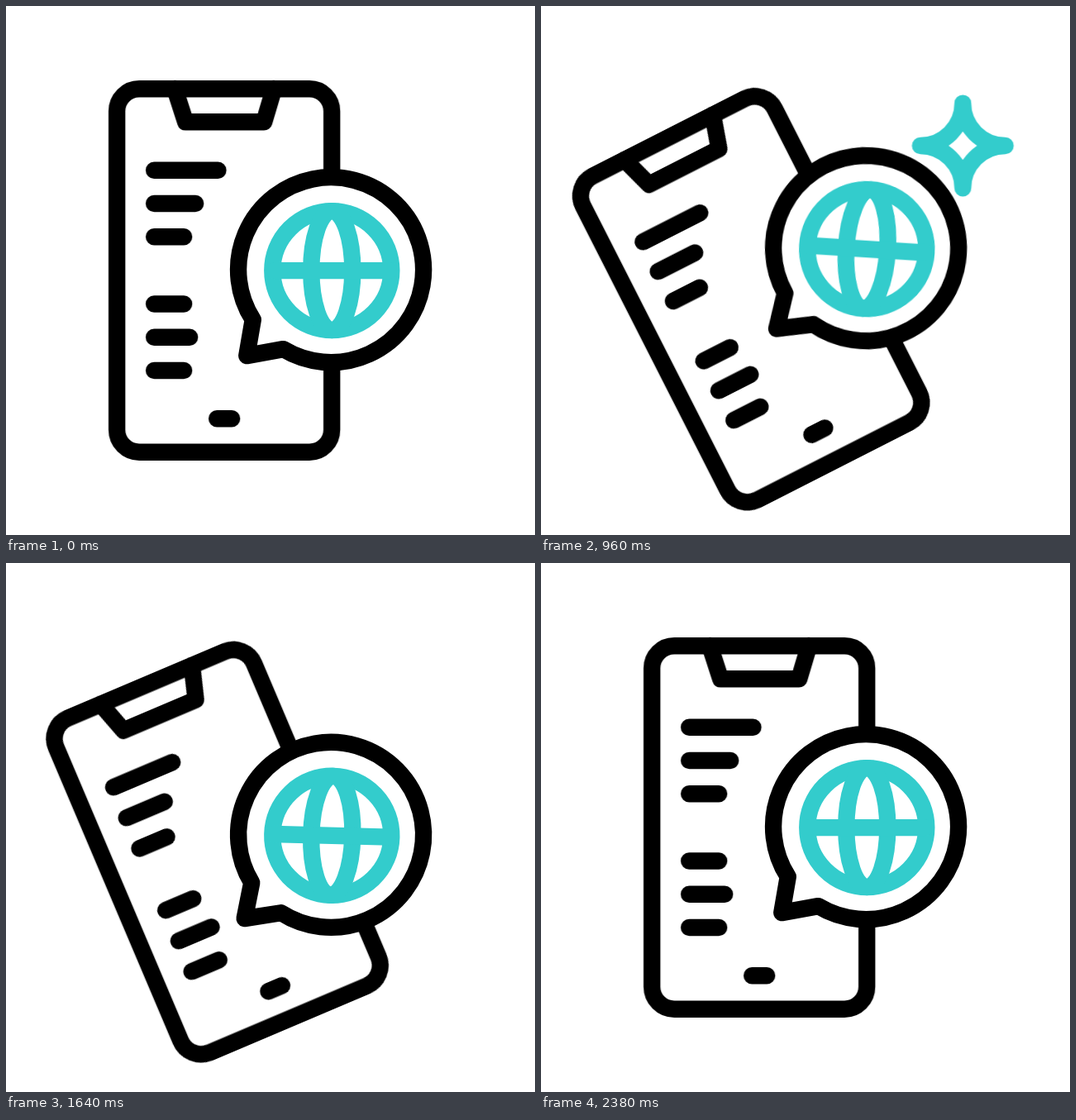
An HTML page that plays this animation: 640x640 px, repeating every 2.4 s.

```html
<!DOCTYPE html>
<html lang="en">
<head>
<meta charset="utf-8">
<title>Phone and globe bubble</title>
<style>
  html, body { margin: 0; width: 100%; height: 100%; overflow: hidden; background: #fff; }
  svg { display: block; width: 100%; height: 100%; }
  g, path { stroke-linecap: round; stroke-linejoin: round; }
  .ink { fill: #fff; stroke: #000; stroke-width: 20.4; }
  .teal { fill: none; stroke: #33cccc; stroke-width: 20.4; }
  .line { fill: none; }

  .phone, .bubble, .spark { animation: 2400ms infinite; }
  .phone { animation-name: tilt; }
  .bubble {
    animation-name: bob, sway;
    animation-timing-function: cubic-bezier(.37, 0, .63, 1);
  }
  .spark { animation-name: twinkle; vector-effect: non-scaling-stroke; }

  @keyframes tilt {
    0% { transform: translate(0px, 0px) rotate(0deg); animation-timing-function: cubic-bezier(.77, 0, .26, 1); }
    49.58% { transform: translate(-10.35px, 35.9px) rotate(-27.8deg); animation-timing-function: cubic-bezier(.75, 0, .25, 1); }
    99.17%, 100% { transform: translate(0px, 0px) rotate(0deg); }
  }
  @keyframes bob {
    0% { translate: 0 0; }
    16.25% { translate: 0 34.5px; }
    43.54% { translate: 0 -28.5px; }
    65% { translate: 0 12px; }
    76.67%, 100% { translate: 0 0; }
  }
  @keyframes sway {
    0% { rotate: 0deg; }
    16.25% { rotate: -15deg; }
    31.25% { rotate: 15deg; }
    47.92% { rotate: -6deg; }
    64.17% { rotate: 2deg; }
    76.67%, 100% { rotate: 0deg; }
  }
  @keyframes twinkle {
    0%, 1% { scale: 0; stroke-width: 0; animation-timing-function: cubic-bezier(.4, 0, .5, 1); }
    5% { stroke-width: 20.4; }
    13.33% { scale: 1; animation-timing-function: cubic-bezier(.3, 0, .3, 1); }
    33.5% { scale: .735; animation-timing-function: cubic-bezier(.7, 0, .7, 1); }
    55% { scale: 1; animation-timing-function: cubic-bezier(.5, 0, .6, 1); }
    63% { stroke-width: 20.4; }
    66.5%, 100% { scale: 0; stroke-width: 0; }
  }
</style>
</head>
<body>
<svg viewBox="0 0 640 640">
  <g transform="translate(264.200 320)">
    <g class="phone ink">
      <rect x="-130" y="-219.700" width="260" height="439.400" rx="27"/>
      <path class="line" d="M-60-220L-47-179.700H48L60-220"/>
      <path d="M-85-121.300h77.300M-85-81h50M-85-40.700h36M-85 40.500h36M-85 80.800h43M-85 121h36M-9 179.200h18"/>
    </g>
  </g>
  <g transform="translate(394.300 320.100)">
    <g class="bubble">
      <path class="ink" d="M-59 95A112 112 0 1 0-95.500 59.500L-103 103Z"/>
      <g class="teal">
        <circle r="72"/>
        <ellipse rx="25" ry="72"/>
        <path d="M-70 0H70"/>
      </g>
    </g>
  </g>
  <g transform="translate(510.300 169)">
    <path class="spark teal" d="M0-68A68 68 0 0 0 68 0A68 68 0 0 0 0 68A68 68 0 0 0-68 0A68 68 0 0 0 0-68Z"/>
  </g>
</svg>
</body>
</html>
```
